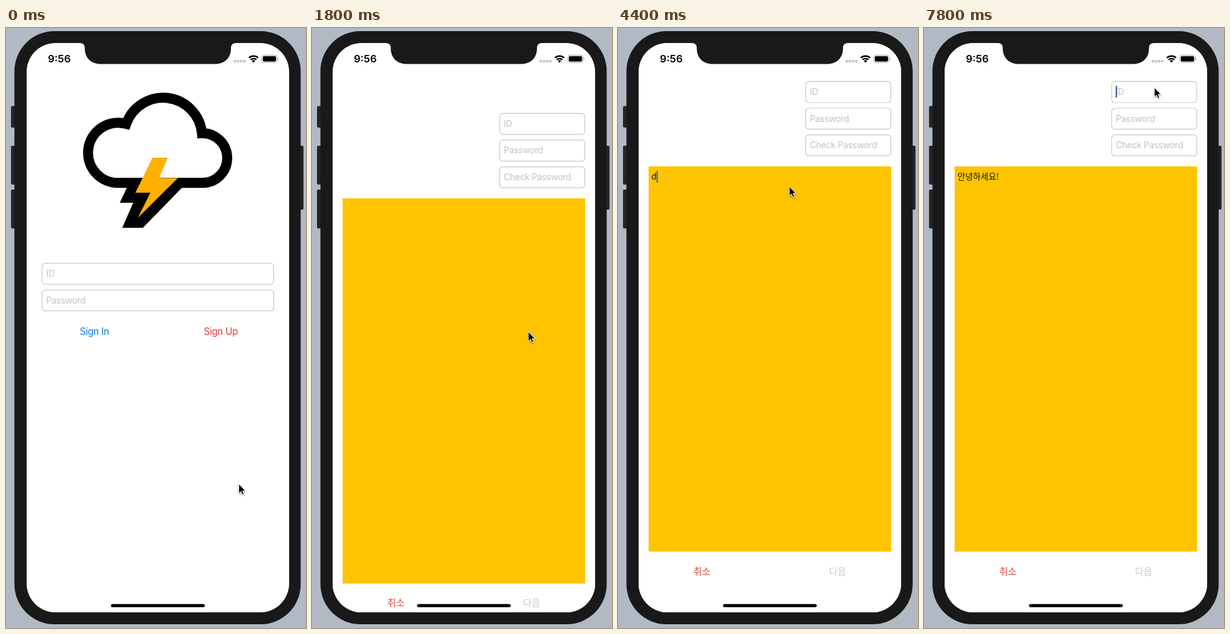
Recreate the animation shown at these times as an HTML page. Size 480 by 958 pixels, loop 8000 ms.

```html
<!DOCTYPE html>
<html lang="ko">
<head>
<meta charset="utf-8">
<title>Sign up flow</title>
<style>
  html, body { margin: 0; width: 100%; height: 100%; overflow: hidden; background: #b1b9c4; }
  svg { display: block; width: 100%; height: 100%; }
  text { font-family: Inter, "Noto Sans CJK KR", "Noto Sans CJK", sans-serif; white-space: pre; }
  .ko { font-family: "Noto Sans CJK KR", "Noto Sans CJK", sans-serif; }
  .hint { font-size: 14.1px; letter-spacing: -.3px; fill: #c2c2c5; }
  .field { fill: #fff; stroke: #c9c9c9; stroke-width: 1.2; }
  .button { font-size: 15.2px; letter-spacing: -.3px; }
  .caret { fill: #3f64b5; }
</style>
</head>
<body>
<svg viewBox="0 0 480 958">
  <defs>
    <clipPath id="glass"><rect x="33" y="24" width="420" height="909" rx="46"/></clipPath>
    <filter id="soft" x="-20%" y="-30%" width="140%" height="170%">
      <feDropShadow dx="0" dy="1.2" stdDeviation="1.2" flood-opacity=".5"/>
    </filter>
  </defs>

  <g fill="#242626">
    <rect x="8" y="124.500" width="8" height="34.500" rx="2"/>
    <rect x="8" y="188" width="8" height="62" rx="2"/>
    <rect x="8" y="258" width="8" height="62" rx="2"/>
    <rect x="468" y="188" width="8" height="102" rx="2"/>
  </g>
  <rect x="13.500" y="5" width="458" height="947" rx="64" fill="#191919"/>

  <g clip-path="url(#glass)">
    <rect x="33" y="24" width="420" height="909" fill="#fff"/>
    <g id="login">
      <path d="M180 247.300A48 48 0 1 1 192.300 153.100A62.500 62.500 0 0 1 313.500 168A39.500 39.500 0 1 1 315 247.300Z"
            fill="none" stroke="#000" stroke-width="16"/>
      <path d="M200 241L182 279H203.500L186 319H219L282.500 254V241Z"/>
      <path d="M234.500 207H259L245 239.500H275L211 303L231 263H207Z" fill="#ffb000"/>
      <text class="button" x="118" y="489.500" fill="#1479e8">Sign In</text>
      <text class="button" id="signUp" x="316.500" y="489.500" fill="#e5392f">Sign Up</text>
    </g>

    <g id="sheet">
      <rect x="33" y="24" width="420" height="909" fill="#fff"/>
      <rect x="49" y="221" width="388" height="615" fill="#ffc400"/>
      <text class="ko" id="note" x="53.500" y="242.300" font-size="13.500" fill="#15130c"></text>
      <rect class="caret" id="noteCaret" y="228" width="2.200" height="19" opacity=".85"/>
      <text class="ko button" x="120.500" y="872.500" font-weight="500" fill="#e5483f">취소</text>
      <text class="ko button" x="337.500" y="872.500" fill="#c9c9c9">다음</text>
    </g>

    <g id="language">
      <rect x="168" y="454" width="150" height="47.500" rx="7.500" fill="#fefefb" filter="url(#soft)"/>
      <text class="ko" x="243" y="485" font-size="17.200" text-anchor="middle" fill="#111">한국어</text>
    </g>

    <text x="67" y="55" font-size="16.500" font-weight="600">9:56</text>
    <g fill="#c4c4c6">
      <rect x="364.200" y="51" width="4" height="4" rx="1"/>
      <rect x="369.200" y="51" width="4" height="4" rx="1"/>
      <rect x="374.200" y="51" width="4" height="4" rx="1"/>
      <rect x="379.200" y="51" width="4" height="4" rx="1"/>
    </g>
    <g fill="none" stroke="#000" stroke-width="2.300">
      <path d="M388.600 47.700A10.800 10.800 0 0 1 403.400 47.700"/>
      <path d="M391.300 50.700A6.900 6.900 0 0 1 400.700 50.700"/>
    </g>
    <path d="M393.300 52.600A4 4 0 0 1 398.700 52.600L396 55.400Z"/>
    <rect x="409.500" y="43.500" width="24" height="11.500" rx="3.200" fill="none" stroke="#999"/>
    <rect x="411" y="45" width="21" height="8.500" rx="1.800"/>
    <path d="M434.700 47.300Q437 49.200 434.700 51.200Z" fill="#888"/>
    <rect x="168" y="919.700" width="150" height="5" rx="2.500"/>
  </g>
  <path d="M118 23V24Q126 24 126 32C126 48 136 57.500 152 57.500H334C350 57.500 360 48 360 32Q360 24 368 24V23Z" fill="#191919"/>

  <g id="pointer" filter="url(#soft)">
    <path d="M0 0V15.200L3.500 12L5.900 17.300L8.400 16.200L6.100 11H10.800Z" stroke="#fff" stroke-width="1"/>
  </g>
</svg>

<script>
const LOOP = 8000, STEP = 200;
const $ = id => document.getElementById(id);

function add(parent, tag, attrs, text = '') {
  const el = document.createElementNS('http://www.w3.org/2000/svg', tag);
  for (const key in attrs) el.setAttribute(key, attrs[key]);
  el.textContent = text;
  return parent.appendChild(el);
}

function addField(parent, x, y, width, hint) {
  add(parent, 'rect', { class: 'field', x, y, width, height: 33.6, rx: 5 });
  add(parent, 'text', { class: 'hint', x: x + 6.5, y: y + 21.5 }, hint);
}

['ID', 'Password'].forEach((hint, i) =>
  addField($('login'), 57.7, 375.6 + i * 42.5, 370.6, hint));
['ID', 'Password', 'Check Password'].forEach((hint, i) =>
  addField($('sheet'), 300.3, 85.4 + i * 42.6, 136.2, hint));
const idCaret = add($('sheet'), 'rect',
  { class: 'caret', x: 306.6, y: 92.5, width: 2.3, height: 18.5 });

// Each row: start time, then the value held until the next row.
const pointerSteps = [
  [0, 372.5, 728], [200, 377, 743], [400, 230, 610], [600, 68, 400],
  [800, 150, 226], [1000, 290, 330], [1200, 342, 470], [1400, 346, 485],
  [2400, 347, 450], [2600, 350, 330], [2800, 354, 170], [3000, 355, 109],
  [3600, 318, 178], [3800, 274, 253],
  [7000, 290, 222], [7200, 335, 142], [7400, 365, 100], [7600, 368.5, 95]
];
const noteSteps = [
  [0, ''], [4400, 'd'], [4800, ''], [5200, 'ㅇ'], [5400, '안'], [5600, '안ㄴ'],
  [5800, '안녀'], [6000, '안녕하'], [6200, '안녕하세요'], [6400, '안녕하세요!']
];
const focusSteps = [[0, ''], [3400, 'id'], [3800, ''], [4000, 'note'], [7400, ''], [7600, 'id']];
const languageSteps = [[0, 0], [5000, 1], [5600, .4], [5800, 0]];
const signUpSteps = [[0, 1], [1400, .2], [1600, .38], [1800, 1]];

const at = (steps, t) => steps.findLast(row => row[0] <= t).slice(1);

// Critically damped slide of the sheet from below the screen.
function sheetOffset(t) {
  const u = Math.max(0, t - 1547) * .0182;
  return 909 * (1 + u) * Math.exp(-u);
}

function draw(t) {
  const [focus] = at(focusSteps, t);
  $('pointer').setAttribute('transform', `translate(${at(pointerSteps, t)})`);
  $('sheet').setAttribute('transform', `translate(0 ${sheetOffset(t).toFixed(2)})`);
  $('signUp').setAttribute('opacity', at(signUpSteps, t)[0]);
  $('language').setAttribute('opacity', at(languageSteps, t)[0]);

  const note = $('note');
  note.textContent = at(noteSteps, t)[0];
  const width = note.textContent ? note.getComputedTextLength() : 0;
  $('noteCaret').setAttribute('x', 53.2 + width);
  $('noteCaret').style.display = focus === 'note' ? '' : 'none';
  idCaret.style.display = focus === 'id' ? '' : 'none';
}

const start = performance.now();
function tick() {
  const t = (performance.now() - start) % LOOP;
  draw(Math.floor(t / STEP) * STEP);
  requestAnimationFrame(tick);
}
tick();
</script>
</body>
</html>
```
